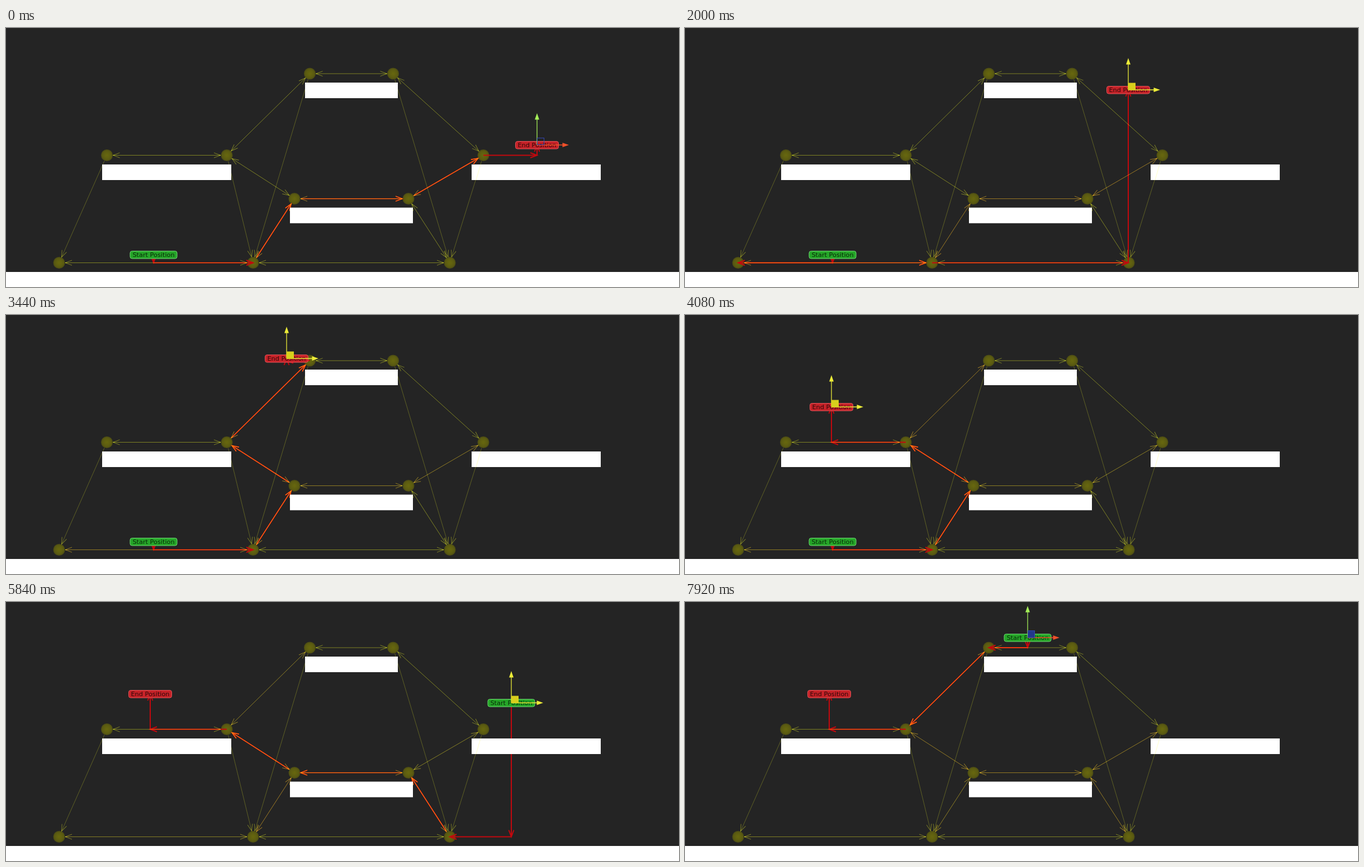
An HTML page with a canvas that plays this animation: 1204x465 px, repeating every 8000 ms.

```html
<!DOCTYPE html>
<html lang="en">
<head>
<meta charset="utf-8">
<title>Path finding</title>
<style>
  html, body { margin: 0; width: 100%; height: 100%; overflow: hidden; background: #242424; }
  canvas { display: block; }
</style>
</head>
<body>
<canvas id="stage" width="1204" height="465"></canvas>
<script>
const ctx = document.getElementById('stage').getContext('2d');
const LOOP = 8000, STEP = 80, GAP = 11;
const GROUND = 421.5, SIDE = 228.5, MIDDLE = 306.5, TOP = 82;

const nodes = [
  [95, GROUND], [442, GROUND], [794, GROUND], [395, SIDE], [516, MIDDLE],
  [720, MIDDLE], [854, SIDE], [543.5, TOP], [692.5, TOP], [180.5, SIDE]
];
const twoWay = ['01', '12', '93', '37', '34', '78', '86', '45', '56', '14', '52'];
const oneWay = ['90', '31', '71', '82', '62'];
const platforms = [[172, 245, 231, 28], [535, 98, 166, 28], [508, 322.5, 220, 28], [833, 245, 231, 28], [0, 438, 1204, 27]];

// time, x, y
const endKeys = [
  [1280, 950, 210], [1440, 953, 198], [1680, 905, 140], [2000, 793, 111], [2160, 740, 97],
  [2560, 650, 70], [2960, 615, 67], [3200, 615, 67], [3440, 502, 78], [3760, 365, 125],
  [4080, 262, 165], [4240, 258, 165]
];
const startKeys = [
  [5440, 264, 407], [5600, 420, 340], [5760, 790, 205], [5840, 904, 181], [6000, 985, 172],
  [6320, 972, 216], [6560, 972, 216], [6640, 982, 196], [6800, 820, 70], [6960, 616, 6],
  [7120, 604, -4], [7440, 612, 30], [7680, 613, 64]
];
// time, visited nodes, floor below the start, floor below the end
const routes = [
  [0, '1456', GROUND, SIDE], [1680, '01', GROUND, GROUND], [2160, '1437', GROUND, TOP],
  [3600, '143', GROUND, SIDE], [5680, '43', MIDDLE, SIDE], [5760, '2543', GROUND, SIDE],
  [6080, '6543', SIDE, SIDE], [6720, '2543', GROUND, SIDE], [6880, '73', TOP, SIDE]
];
const gizmoModes = [
  [0, 'idle'], [1120, 'hover'], [1360, 'drag'], [4400, 'idle'], [5040, 'hover'], [5520, 'drag'], [7760, 'hover']
];

const latest = (list, t) => list.filter(item => item[0] <= t).pop();

function at(keys, t) {
  const i = keys.findIndex(k => k[0] > t);
  if (i === 0) return keys[0].slice(1);
  if (i < 0) return keys[keys.length - 1].slice(1);
  const [t0, x0, y0] = keys[i - 1], [t1, x1, y1] = keys[i];
  const p = (t - t0) / (t1 - t0);
  return [x0 + (x1 - x0) * p, y0 + (y1 - y0) * p];
}

function line(a, b) {
  ctx.beginPath();
  ctx.moveTo(...a);
  ctx.lineTo(...b);
  ctx.stroke();
}

function arrow(a, b, both) {
  if (Math.hypot(b[0] - a[0], b[1] - a[1]) < 1) return;
  line(a, b);
  head(a, b);
  if (both) head(b, a);
}

function head(a, b) {
  ctx.save();
  ctx.translate(...b);
  ctx.rotate(Math.atan2(b[1] - a[1], b[0] - a[0]));
  ctx.beginPath();
  ctx.moveTo(-12, -4.5);
  ctx.lineTo(0, 0);
  ctx.lineTo(-12, 4.5);
  ctx.stroke();
  ctx.restore();
}

// ends of an edge, clear of the node spheres
function span(edge) {
  const a = nodes[edge[0]], b = nodes[edge[1]];
  const k = GAP / Math.hypot(b[0] - a[0], b[1] - a[1]);
  const dx = (b[0] - a[0]) * k, dy = (b[1] - a[1]) * k;
  return [[a[0] + dx, a[1] + dy], [b[0] - dx, b[1] - dy]];
}

function heat(edge, t) {
  const back = edge[1] + edge[0];
  let last = -1e5;
  routes.forEach(([from, path], i) => {
    if (from > t || !(path.includes(edge) || path.includes(back))) return;
    last = Math.min(t, i + 1 < routes.length ? routes[i + 1][0] : LOOP);
  });
  return Math.exp((last - t) / 3000);
}

function drawNode([x, y]) {
  const shade = ctx.createRadialGradient(x, y, 1, x, y, 10.5);
  shade.addColorStop(0, '#66660f');
  shade.addColorStop(0.7, '#5b5b11');
  shade.addColorStop(1, '#4b4b14');
  ctx.fillStyle = shade;
  ctx.beginPath();
  ctx.arc(x, y, 10.5, 0, 7);
  ctx.fill();
}

function drawRoute(start, end, [, path, startFloor, endFloor]) {
  const stub = '#c3080e';
  const below = [start[0], startFloor], landing = [end[0], endFloor];
  ctx.lineWidth = 2;
  ctx.strokeStyle = stub;
  arrow(start, below);
  arrow(below, nodes[path[0]]);
  arrow(nodes[path[path.length - 1]], landing);
  arrow(landing, end);
  ctx.lineWidth = 1.7;
  ctx.strokeStyle = '#f0240f';
  for (let i = 1; i < path.length; i++) arrow(...span(path.slice(i - 1, i + 1)));
}

function drawEdges(t) {
  ctx.globalCompositeOperation = 'lighter';
  ctx.lineWidth = 1;
  for (const edge of twoWay) {
    const h = heat(edge, t);
    ctx.strokeStyle = `rgb(${88 + 32 * h}, ${92 - 10 * h}, 0)`;
    arrow(...span(edge), true);
  }
  for (const edge of oneWay) {
    const [a, b] = span(edge);
    ctx.strokeStyle = 'rgb(56, 58, 0)';
    line(a, b);
    ctx.strokeStyle = 'rgb(80, 82, 0)';
    head(a, b);
  }
  ctx.globalCompositeOperation = 'source-over';
}

function drawLabel([x, y], text, width, fill, rim, ink) {
  ctx.beginPath();
  ctx.roundRect(x - width / 2 + 0.5, y - 6.5, width - 1, 13.5, 3.5);
  ctx.fillStyle = fill;
  ctx.fill();
  ctx.strokeStyle = rim;
  ctx.lineWidth = 1;
  ctx.stroke();
  ctx.fillStyle = ink;
  ctx.fillText(text, x, y + 4);
}

function axis(angle, color) {
  ctx.save();
  ctx.rotate(angle);
  ctx.fillStyle = ctx.strokeStyle = color;
  ctx.lineWidth = 1.3;
  line([0, 0], [46, 0]);
  ctx.beginPath();
  ctx.moveTo(57, 0);
  ctx.lineTo(45.5, -4);
  ctx.lineTo(45.5, 4);
  ctx.fill();
  ctx.restore();
}

function drawGizmo([x, y], mode) {
  const drag = mode === 'drag';
  ctx.save();
  ctx.translate(x, y);
  axis(0, drag ? '#ecec38' : '#f0502a');
  axis(-Math.PI / 2, drag ? '#ecec38' : '#a4ee58');
  if (mode !== 'idle') {
    ctx.fillStyle = drag ? '#d8cf1c' : '#23378c';
    ctx.fillRect(0, -12.5, 13, 13);
  }
  if (!drag) {
    ctx.strokeStyle = '#3346b0';
    ctx.lineWidth = 1;
    ctx.strokeRect(0.5, -12.5, 12, 12);
  }
  ctx.restore();
}

function draw(t) {
  const start = at(startKeys, t), end = at(endKeys, t);
  ctx.fillStyle = '#242424';
  ctx.fillRect(0, 0, 1204, 465);
  nodes.forEach(drawNode);
  drawRoute(start, end, latest(routes, t));
  drawEdges(t);
  ctx.fillStyle = '#fff';
  platforms.forEach(p => ctx.fillRect(...p));
  ctx.strokeStyle = 'rgba(255, 255, 120, 0.4)';
  line([849, 245], [841, 273]);
  drawLabel(end, 'End Position', 78, '#c62228', '#e2555a', '#2c0808');
  drawLabel(start, 'Start Position', 85, '#25a628', '#6fd872', '#082808');
  drawGizmo(t < 5040 ? end : start, latest(gizmoModes, t)[1]);
}

ctx.font = '11.3px "DejaVu Sans", sans-serif';
ctx.textAlign = 'center';

function tick() {
  const t = performance.now() % LOOP;
  draw(Math.floor(t / STEP) * STEP);
  requestAnimationFrame(tick);
}
tick();
</script>
</body>
</html>
```
